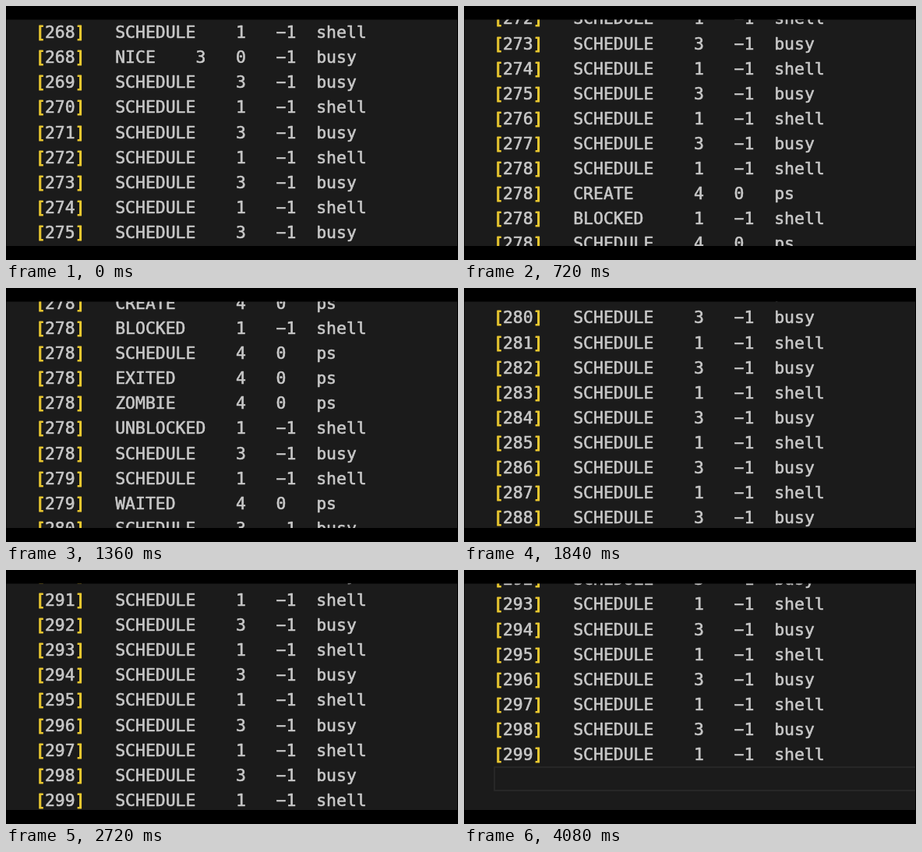
Animation of 580 by 326 pixels, one loop 4960 ms. Source, as an HTML page with a canvas:

```html
<!DOCTYPE html>
<html lang="en">
<head>
<meta charset="utf-8">
<title>Scheduler log</title>
<style>
  html, body { margin: 0; width: 100%; height: 100%; overflow: hidden; background: #000; }
  canvas { display: block; }
</style>
</head>
<body>
<canvas id="stage" width="580" height="326"></canvas>
<script>
const ctx = document.getElementById('stage').getContext('2d');
const LOOP = 4960, STEP = 80;
const PITCH = 32.1, CELL = 12.9, LEFT = 37, BASE = 41.1;
const PANEL = [0.5, 17.5, 578.5, 290.5];
const GREY = '#c8c8c8', GOLD = '#eac830';

// Log rows: tick, event, process id, priority, process name
const rows = [];
const add = (tick, event, pid, prio, name) => rows.push({ tick, event, pid, prio, name });
const shell = (tick, event = 'SCHEDULE') => add(tick, event, 1, '\u22121', 'shell');
const busy = tick => add(tick, 'SCHEDULE', 3, '\u22121', 'busy');
const ps = (tick, event) => add(tick, event, 4, '0', 'ps');
const alternate = (from, to, shellParity) => {
  for (let n = from; n <= to; n++) (n % 2 === shellParity ? shell : busy)(n);
};

shell(268);
rows.push({ tick: 268, event: 'NICE', nice: 3, pid: 0, prio: '\u22121', name: 'busy' });
alternate(269, 278, 0);
ps(278, 'CREATE');
shell(278, 'BLOCKED');
['SCHEDULE', 'EXITED', 'ZOMBIE'].forEach(e => ps(278, e));
shell(278, 'UNBLOCKED');
busy(278);
shell(279);
ps(279, 'WAITED');
alternate(280, 299, 1);

// Scroll keys: time in ms, offset in px, speed in px/ms
const keys = [
  [0, 0, 0.2],
  [480, 118.2, 0.26],
  [1120, 294.6, 0.36],
  [1840, 669.8, 0.58],
  [2240, 904.5, 0.6],
  [2800, 1022.9, 0],
  [3360, 1022.9, 0],
  [3920, 1081.1, 0],
  [LOOP, 1081.1, 0]
];

function scrollAt(t) {
  const i = keys.findIndex(k => k[0] > t);
  const [t0, y0, v0] = keys[i - 1], [t1, y1, v1] = keys[i];
  const d = t1 - t0, u = (t - t0) / d, w = 1 - u;
  return y0 * w * w * (1 + 2 * u) + y1 * u * u * (3 - 2 * u)
    + d * u * w * (v0 * w - v1 * u);
}

// A thin outline thickens the regular face
function put(text, col, y, color = GREY, weight = 0.6) {
  ctx.fillStyle = ctx.strokeStyle = color;
  ctx.lineWidth = weight;
  for (const ch of String(text)) {
    const x = LEFT + CELL * col++;
    ctx.fillText(ch, x, y);
    ctx.strokeText(ch, x, y);
  }
}

function drawRow(r, y) {
  put('[', 0.07, y, GOLD, 1.1);
  put(r.tick, 1, y);
  put(']', 4, y, GOLD, 1.1);
  put(r.event, 8, y);
  if (r.nice) put(r.nice, 16, y);
  put(r.pid, 20, y);
  put(r.prio, 24, y);
  put(r.name, 28, y);
}

function draw(t) {
  const scroll = scrollAt(t);
  ctx.fillStyle = '#000';
  ctx.fillRect(0, 0, 580, 326);
  ctx.save();
  ctx.beginPath();
  ctx.rect(...PANEL);
  ctx.clip();
  ctx.fillStyle = '#1b1b1b';
  ctx.fillRect(0, 0, 580, 326);
  ctx.font = '21.4px "DejaVu Sans Mono", monospace';
  ctx.lineJoin = 'round';
  rows.forEach((r, i) => {
    const y = BASE + i * PITCH - scroll;
    if (y > 0 && y < 340) drawRow(r, y);
  });
  // Current-line outline below the last row
  const y = BASE + rows.length * PITCH - scroll - 23;
  ctx.strokeStyle = '#272727';
  ctx.lineWidth = 2;
  ctx.strokeRect(39, y, 560, 30);
  ctx.restore();
}

function tick(now) {
  draw(Math.floor((now % LOOP) / STEP) * STEP);
  requestAnimationFrame(tick);
}
draw(0);
requestAnimationFrame(tick);
</script>
</body>
</html>
```
